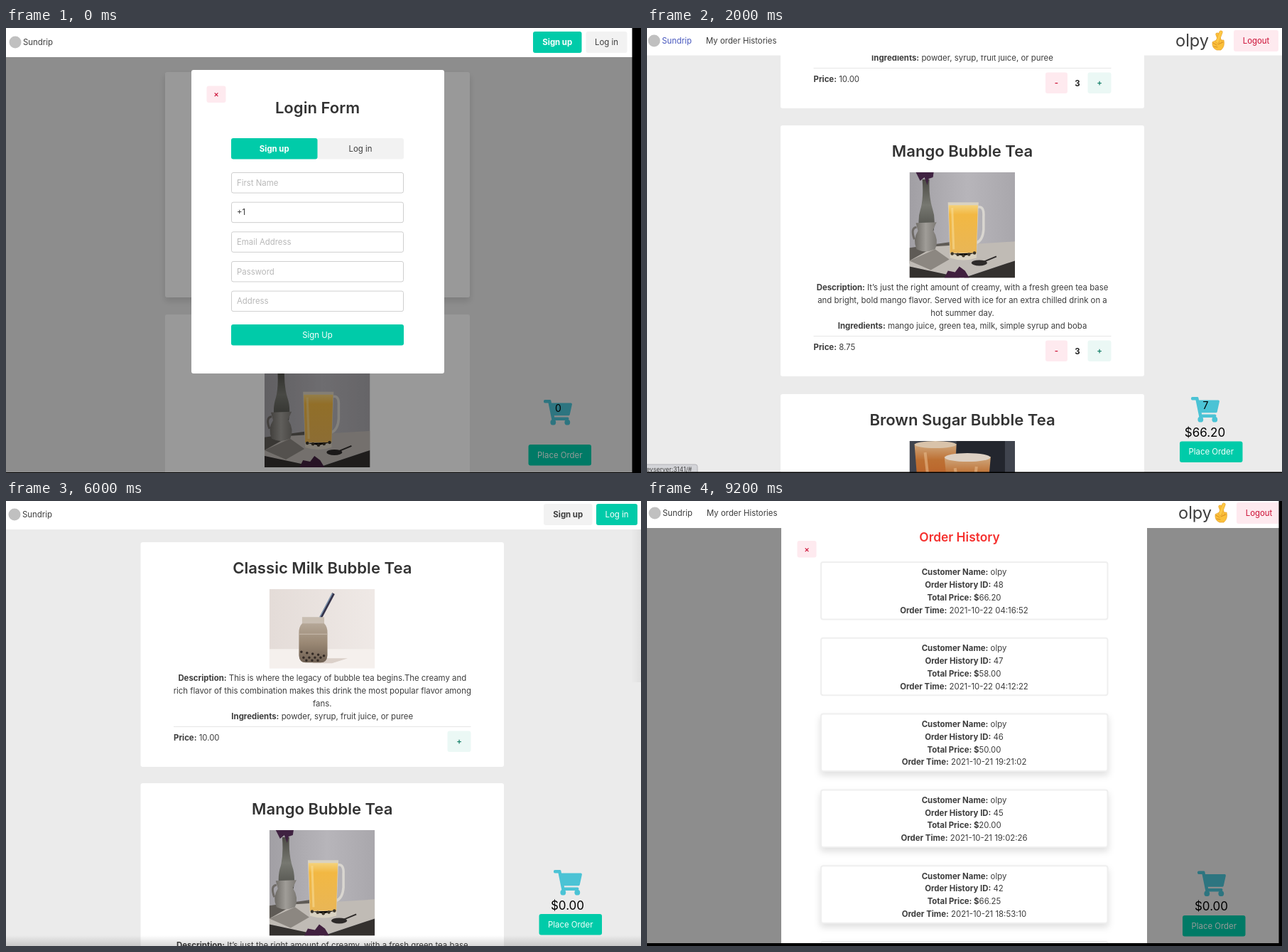
Recreate the animation shown at these times as an HTML page. Size 894 by 626 pixels, loop 10000 ms.

```html
<!DOCTYPE html>
<html lang="en">
<head>
<meta charset="utf-8">
<title>Tea shop</title>
<style>
  html, body { margin: 0; width: 100%; height: 100%; overflow: hidden; background: #ebebeb; }
  svg { display: block; width: 100%; height: 100%; font-family: Inter, Roboto, sans-serif; }
  .shadow { filter: drop-shadow(0 5px 5px rgba(10, 10, 10, .13)); }
</style>
</head>
<body>
<svg viewBox="0 0 894 626">
  <defs>
    <linearGradient id="wall" x2="1"><stop stop-color="#a19fa4"/><stop offset=".55" stop-color="#b7b5ba"/><stop offset="1" stop-color="#a9a7ac"/></linearGradient>
    <linearGradient id="vaseFill" x2="0" y2="1"><stop stop-color="#4b4a44"/><stop offset=".5" stop-color="#777871"/><stop offset="1" stop-color="#4f4f4a"/></linearGradient>
    <linearGradient id="pitcherFill" x2="1"><stop stop-color="#6c6964"/><stop offset=".5" stop-color="#a09d98"/><stop offset="1" stop-color="#7b7873"/></linearGradient>
    <linearGradient id="mangoFill" x2="0" y2="1"><stop stop-color="#f5d27a"/><stop offset=".2" stop-color="#f2b843"/><stop offset="1" stop-color="#e9b656"/></linearGradient>
    <linearGradient id="milkWall" x2="1" y2="0"><stop stop-color="#e4dcd8"/><stop offset="1" stop-color="#efe9e6"/></linearGradient>
    <linearGradient id="milkFill" x2="0" y2="1"><stop stop-color="#b5a797"/><stop offset=".5" stop-color="#9a8874"/><stop offset="1" stop-color="#6f6053"/></linearGradient>
    <linearGradient id="sugarFill" x2="0" y2="1"><stop stop-color="#d0a980"/><stop offset=".25" stop-color="#bd7033"/><stop offset=".65" stop-color="#b95c25"/><stop offset="1" stop-color="#35170d"/></linearGradient>
    <linearGradient id="fadeDown" x2="0" y2="1"><stop stop-opacity="0"/><stop offset="1" stop-opacity=".15"/></linearGradient>
    <linearGradient id="fadeRight" x2="1"><stop stop-opacity="0"/><stop offset="1" stop-opacity=".05"/></linearGradient>

    <symbol id="milk" viewBox="0 0 148 111">
      <path fill="url(#milkWall)" d="M0 0H148V111H0Z"/>
      <path fill="#f5f0ed" d="M0 84H148V111H0Z"/>
      <path fill="#dbd0c9" d="M70 97H110L88 104H60Z"/>
      <path stroke="#35334a" stroke-width="4" d="M72 40L90 6"/>
      <path stroke="#8fb0cc" stroke-width="1" d="M70.500 40L88.500 6"/>
      <path fill="#c9beb2" d="M46 39H77V49H46Z"/>
      <path fill="url(#milkFill)" d="M46 48H77Q82 53 81.500 62V93Q81 103 72 103H51Q42 103 41.500 93V62Q41 53 46 48Z"/>
      <path stroke="#c9bdaf" d="M42 63H81M46 43H77"/>
      <path stroke="#332a25" stroke-width="3.500" stroke-linecap="round" stroke-dasharray="0 8" d="M45 88L80 94M48 96H78M52 100H76"/>
    </symbol>

    <symbol id="mango" viewBox="0 0 148 148">
      <path fill="url(#wall)" d="M0 0H148V148H0Z"/>
      <path fill="#5f5b56" d="M0 106L56 98V128H0Z"/>
      <path fill="#c0bbb5" d="M36 104L148 97V124L74 148L0 132V124Z"/>
      <path fill="#8c8781" d="M0 124L36 108L56 122L30 137Z"/>
      <path fill="#34312f" d="M0 132L70 147V148H0ZM148 124V148H76Z"/>
      <path fill="url(#vaseFill)" d="M18 10H28Q27 34 32 50Q37 64 34 82H14Q11 64 16 50Q20 34 18 10Z"/>
      <path fill="#3f2241" d="M9 0H34L33 7L27 9L25 18L21 7L15 12Z"/>
      <path fill="none" stroke="#6f6b67" stroke-width="3" d="M10 77Q1 78 7 94"/>
      <path fill="url(#pitcherFill)" d="M9 71L38 70L33 81Q42 95 36 108Q22 114 10 108Q4 94 12 82Z"/>
      <path fill="none" stroke="#d9d6d0" stroke-width="3.500" d="M95 49Q105 46 104 62V80Q103 95 94 99"/>
      <path fill="#d9d2c2" d="M54 42H97L94 120Q76 126 57 120Z"/>
      <path fill="url(#mangoFill)" d="M55 46H96L94 113H57Z"/>
      <path stroke="#f8dc96" stroke-width="3" opacity=".6" d="M60 50L62 108"/>
      <path stroke="#3b3428" stroke-width="4.500" stroke-linecap="round" stroke-dasharray="0 8" d="M60 114L76 117L92 113"/>
      <path fill="none" stroke="#2d2a29" stroke-width="2" d="M98 128L122 118"/>
      <ellipse cx="98" cy="127" rx="11" ry="4" fill="#2d2a29"/>
      <path fill="#41203f" d="M49 148L54 138L64 140L70 132L78 138L84 148Z"/>
    </symbol>

    <symbol id="sugar" viewBox="0 0 148 148">
      <path fill="#40444e" d="M0 0H148V148H0Z"/>
      <path fill="#23262e" d="M66 0H134V70H66Z"/>
      <path fill="#b9b5b3" d="M112 76L148 62V148H100Z"/>
      <path fill="#30221e" d="M0 92H120L104 148H0Z"/>
      <path fill="url(#sugarFill)" d="M7 4H66L60 94H14Z"/>
      <ellipse cx="36.500" cy="5" rx="29" ry="5" fill="#d9c3aa"/>
      <path fill="url(#sugarFill)" d="M49 22H114L106 116H58Z"/>
      <ellipse cx="81.500" cy="23" rx="32" ry="6" fill="#ddd0c3"/>
      <path stroke="#e6b98a" stroke-width="4" opacity=".6" d="M22 16L27 60M64 38L70 78M94 36L88 84"/>
    </symbol>

    <g id="cart" fill="#4bc3d5">
      <path d="M1.700 0H8.800Q10.200 0 10.400 1.300L11 4.400H38.300Q40 4.400 39.900 6.500L36.700 20.900Q36.300 22.200 35 22.200H14.700L15.100 24.400H33.800Q35.800 24.600 35.400 26.500L34.800 28.900H11.500L6.500 4.400H1.700Q0 4.400 0 2.800V1.700Q0 0 1.700 0Z"/>
      <circle cx="13.300" cy="31.700" r="3.900"/><circle cx="33.300" cy="31.700" r="3.900"/>
    </g>

    <g id="fingers" stroke-linecap="round" stroke-linejoin="round">
      <path fill="#fbc03a" stroke="#e6a02c" stroke-width=".7" d="M2 17Q1 25 8 28H14Q20 23 18 14L8 14Z"/>
      <path stroke="#e6a02c" stroke-width="5" d="M13 16L9 6"/>
      <path stroke="#fbc03a" stroke-width="4" d="M13 16L9 6"/>
      <path stroke="#e6a02c" stroke-width="5" d="M9 16L14 3"/>
      <path stroke="#fdc845" stroke-width="4" d="M9 16L14 3"/>
      <path fill="none" stroke="#d98f25" d="M3 18L8 21M4 23L9 24M17 17L10 20"/>
    </g>
  </defs>
  <g id="stage"></g>
</svg>

<script>
const GREEN = '#00cba9', GREY = '#f2f2f2', PINK = '#feeaef', RED = '#cc0f35', INK = '#3d3d3d';
const BRAND = 'Sundrip', USER = 'olpy';

const drinks = {
  milk: {
    title: 'Classic Milk Bubble Tea', h: 111, price: '10.00',
    lines: ['*Description:* This is where the legacy of bubble tea begins.The creamy and',
      'rich flavor of this combination makes this drink the most popular flavor among',
      'fans.', '*Ingredients:* powder, syrup, fruit juice, or puree']
  },
  mango: {
    title: 'Mango Bubble Tea', h: 148, price: '8.75',
    lines: ['*Description:* It’s just the right amount of creamy, with a fresh green tea base',
      'and bright, bold mango flavor. Served with ice for an extra chilled drink on a',
      'hot summer day.', '*Ingredients:* mango juice, green tea, milk, simple syrup and boba']
  },
  sugar: { title: 'Brown Sugar Bubble Tea', h: 148, price: '9.95', lines: [] }
};

const rect = (x, y, w, h, fill, extra = '') =>
  `<rect x="${x}" y="${y}" width="${w}" height="${h}" fill="${fill}" ${extra}/>`;

// y is the middle of the capitals; *stars* mark bold runs.
function text(x, y, s, { size = 11.4, fill = INK, anchor = 'middle', weight = 400 } = {}) {
  const runs = s.replace(/\*(.+?)\*/g, '<tspan font-weight="700">$1</tspan>');
  return `<text x="${x}" y="${y + size * .36}" font-size="${size}" fill="${fill}" ` +
    `text-anchor="${anchor}" font-weight="${weight}">${runs}</text>`;
}
const left = (x, y, s, style) => text(x, y, s, { anchor: 'start', ...style });
const heading = (x, y, s) => text(x, y, s, { size: 22.1, weight: 600, fill: '#333' });
const lines = (x, y, list) => list.map((s, i) => text(x, y + i * 17.85, s)).join('');
const panel = (x, y, w, h, extra = '') => rect(x, y, w, h, '#fff', 'rx="3" ' + extra);
const button = (x, y, w, h, label, fill, color, weight = 400) =>
  rect(x, y, w, h, fill, 'rx="3"') + text(x + w / 2, y + h / 2, label, { fill: color, weight });
const closeButton = (x, y) => button(x, y, 27, 23.5, '×', PINK, RED, 500);
const use = (id, x, y, size = '') => `<use href="#${id}" x="${x}" y="${y}" ${size}/>`;
const photo = (id, x, y, w) => use(id, x, y, `width="${w}" height="${w * drinks[id].h / 148}"`);
const page = rect(0, 0, 894, 626, '#ebebeb');
const dim = rect(0, 0, 894, 626, '#000', 'opacity=".4"');
const edges = (right, bottom) => rect(right, 0, 894 - right, 626, '#000') +
  rect(0, bottom, 894, 626 - bottom, '#000');

function card(x, top, w, id, qty) {
  const d = drinks[id], mid = x + w / 2, end = top + 66 + d.h;
  const l = x + 46.5, r = x + w - 46.5;
  return panel(x, top, w, end + 139 - top) +
    heading(mid, top + 36, d.title) +
    photo(id, mid - 74.5, top + 66, 148.5) +
    lines(mid, end + 14, d.lines) +
    rect(l, end + 82, r - l, 1, '#e6e6e6') +
    left(l, end + 98, '*Price:* ' + d.price) +
    button(r - 33, end + 88.5, 33, 29.5, '+', '#ebf8f5', '#17806a', 600) +
    (qty ? button(r - 92.5, end + 88.5, 31, 29.5, '-', PINK, RED, 600) +
      text(r - 47.5, end + 103.5, qty, { weight: 700, fill: '#222' }) : '');
}

function basket(x, y, count, total, bx, by) {
  return use('cart', x, y) + text(x + 20.5, y + 11.5, count, { size: 14, fill: '#000' }) +
    text(x + 19.5, y + 49.5, total, { size: 17, fill: '#000' }) +
    button(bx, by, 88.5, 29.5, 'Place Order', GREEN, '#f4fffc');
}

const brand = (h, x, y, color) => rect(0, 0, 894, h, '#fff') +
  `<circle cx="${x}" cy="${y}" r="8.500" fill="#c0c0c0"/>` + left(x + 11, y, BRAND, { fill: color });

const guestNav = (h, x, y, upX, inX, upActive) => brand(h, x, y) +
  button(upX, y - 15, 68.5, 30, 'Sign up', upActive ? GREEN : GREY, upActive ? '#fff' : INK, 700) +
  button(inX, y - 15, 58, 30, 'Log in', upActive ? GREY : GREEN, upActive ? INK : '#fff');

const userNav = (h, y, dx, rx, color) => brand(h, 10 + dx, y, color) +
  left(83 + dx, y, 'My order Histories') +
  left(744 + rx, y, USER, { size: 23.6 }) + use('fingers', 794 + rx, y - 15) +
  button(826 + rx, y - 15, 63, 30, 'Logout', PINK, RED);

function signUp() {
  const field = (label, i) => rect(317.5, 203.5 + i * 41.65, 242, 28.5, '#fff', 'rx="2.5" stroke="#cfcfcf"') +
    left(325, 217.7 + i * 41.65, label, { fill: label == '+1' ? '#333' : '#b8b8b8' });
  return page + panel(224, 62, 429, 317, 'class="shadow"') + panel(224, 403, 429, 355) +
    photo('mango', 364, 469.5, 148.5) + basket(757, 523, '0', '', 735.5, 586) + dim +
    guestNav(41, 13, 20, 742, 816.5, true) +
    panel(261, 59, 356, 427) + closeButton(282.5, 81.5) +
    heading(438.5, 112, 'Login Form') +
    button(438, 155, 122, 29.5, 'Log in', GREY, INK) +
    button(317, 155, 121.5, 29.5, 'Sign up', GREEN, '#fff', 700) +
    ['First Name', '+1', 'Email Address', 'Password', 'Address'].map(field).join('') +
    button(317, 417, 243, 29.5, 'Sign Up', GREEN, '#fff') + edges(881.5, 625);
}

function shopping() {
  return page + card(188, -203, 512, 'milk', '3') + card(188, 137, 512, 'mango', '3') +
    card(188, 515, 512, 'sugar', '1') + basket(766, 519, '7', '$66.20', 750, 581.5) +
    userNav(38.5, 18, 0, 0, '#4a5abf') +
    rect(-4, 614, 75, 16, '#d3d4d8', 'rx="3" stroke="#b4b4b8"') +
    left(-1, 621, 'evserver:3141/#', { size: 8.6, fill: '#444' }) + edges(894, 624.5);
}

function checkout() {
  const item = (id, y, h, qty, sum) => {
    const d = drinks[id], photoH = d.h * 74.5 / 148;
    return panel(244, y, 405.5, h, 'class="shadow"') + photo(id, 409, y + 3.8, 74.5) +
      lines(446.5, y + photoH + 17.2, ['*Name:*', d.title, '*Price:*', d.price,
        '*Quantity:*', qty, '*Sum:*', sum]);
  };
  return page + basket(770, 519, '7', '$66.20', 754, 581.5) + dim +
    userNav(37, 16, 1, 4) + rect(189, 37, 515, 589, '#fff') + closeButton(211.5, 48) +
    item('milk', 77, 209.5, '3', '30.00') + item('mango', 310.5, 229, '3', '26.25') +
    item('sugar', 563.5, 229, '1', '9.95') + edges(893, 619.5);
}

function menu() {
  return page + card(189.5, 58, 511.5, 'milk') + card(189.5, 397, 511.5, 'mango') +
    basket(771, 519, '', '$0.00', 750.5, 581) + guestNav(40, 12, 19, 757, 831, false) +
    rect(880, 40, 14, 215, 'url(#fadeRight)') + rect(0, 611, 894, 15, 'url(#fadeDown)');
}

function history() {
  const orders = [[48, '66.20', '22 04:16:52'], [47, '58.00', '22 04:12:22'], [46, '50.00', '21 19:21:02'],
    [45, '20.00', '21 19:02:26'], [42, '66.25', '21 18:53:10'], [41, '30.00', '21 18:40:31']];
  const entry = ([id, total, time], i) => {
    const y = 86 + i * 106.8;
    return panel(245, y, 403.5, 80.5, `stroke="#efefef" stroke-width="2" ${i > 1 ? 'class="shadow"' : ''}`) +
      lines(446.5, y + 14.2, [`*Customer Name:* ${USER}`, `*Order History ID:* ${id}`,
        `*Total Price: $*${total}`, `*Order Time:* 2021-10-${time}`]);
  };
  return page + basket(775, 520.5, '', '$0.00', 754, 583) + dim +
    userNav(38, 17, 1, 4) + rect(189, 38, 515, 588, '#fff') +
    text(440, 50.5, 'Order History', { size: 17.4, weight: 600, fill: '#f5302e' }) +
    closeButton(211.5, 56) + orders.map(entry).join('') + edges(889.5, 622);
}

const scenes = [signUp, shopping, checkout, menu, history].map(draw => draw());
const stage = document.getElementById('stage');
let shown = -1;

function tick() {
  const now = Math.floor(performance.now() % 10000 / 2000);
  if (now !== shown) stage.innerHTML = scenes[shown = now];
  requestAnimationFrame(tick);
}
tick();
</script>
</body>
</html>
```
